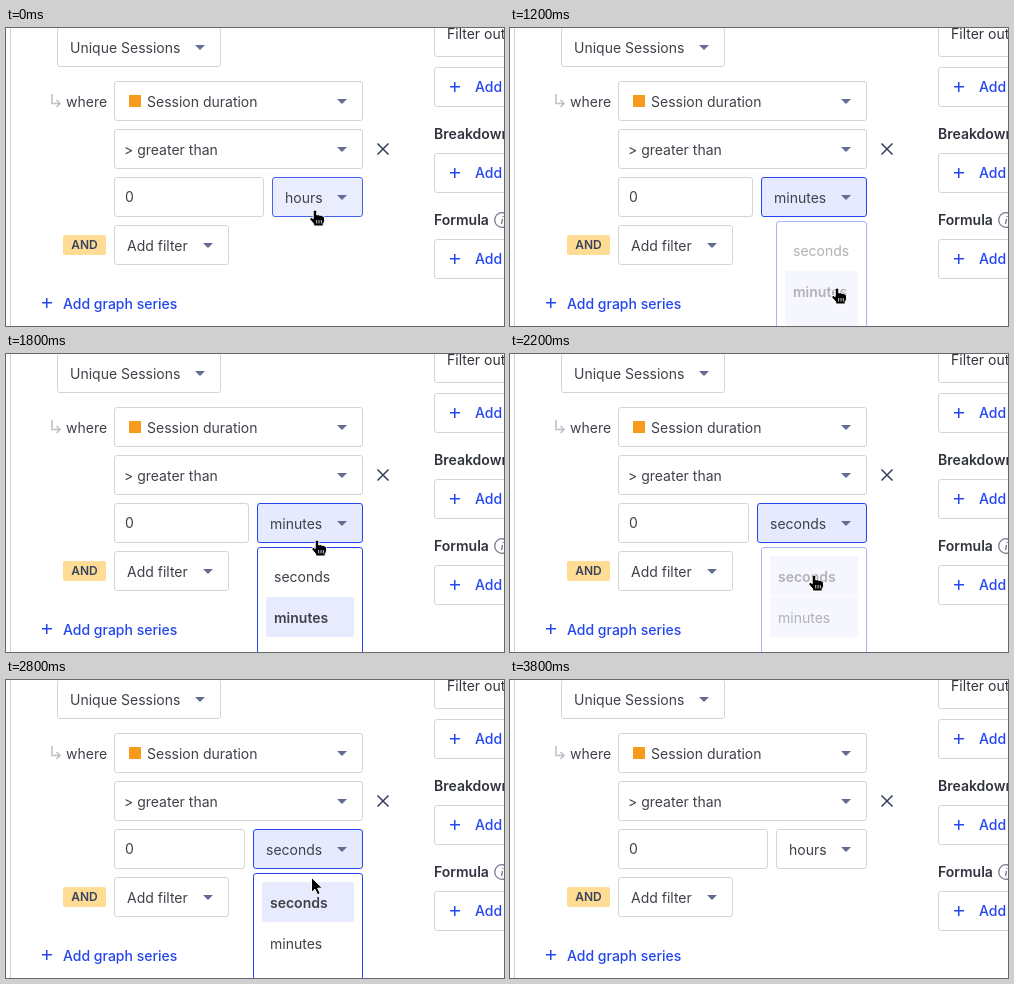
An HTML page that plays this animation: 498x298 px, repeating every 4500 ms.

```html
<!DOCTYPE html>
<html lang="en">
<head>
<meta charset="utf-8">
<title>Session duration filter</title>
<style>
  html, body { margin: 0; width: 100%; height: 100%; overflow: hidden; background: #fff; }
  #stage {
    --blue: #2446ee;
    position: relative; width: 498px; height: 298px; overflow: hidden;
    font: 14px/20px Inter, "Open Sans", sans-serif; color: #3f4149;
  }
  #stage * { box-sizing: border-box; }
  .abs, .box, .menu, svg { position: absolute; white-space: nowrap; }
  .box {
    height: 40px; border: 1px solid #d2d4da; border-radius: 3px;
    background: #fff; line-height: 40px; padding-left: 12px;
  }
  .wide { left: 108px; width: 249px; }
  .caret::after {
    content: ""; position: absolute; right: 15px; top: 17px;
    border: 5px solid transparent; border-top-color: #626b92; border-bottom: 0;
  }
  .blue { color: var(--blue); font-weight: 500; }
  .head { left: 428px; color: #30333d; font-weight: 600; }
  .side { left: 428px; width: 120px; line-height: 38px; }
  .add { padding-left: 40px; }
  .plus, .add::before {
    content: ""; position: absolute; left: 15px; top: 14px; width: 10px; height: 10px;
    background: linear-gradient(var(--blue) 0 0) center / 10px 1.5px no-repeat,
                linear-gradient(var(--blue) 0 0) center / 1.5px 10px no-repeat;
  }
  .badge {
    left: 57px; top: 207px; width: 43px; height: 20px; border-radius: 2px;
    background: #fedc94; color: #39425f; font-size: 12px; font-weight: 600; text-align: center;
  }
  .menu {
    top: 193px; height: 150px; padding: 8px; border: 1px solid var(--blue);
    border-radius: 3px; background: #fff;
  }
  .item { height: 40px; margin-bottom: .5px; padding-left: 8px; line-height: 41px; border-radius: 2px; }
  .lit { background: #e8ebfe; }
  .chosen { font-weight: 600; }
  svg { overflow: visible; }
</style>
</head>
<body>
<div id="stage">
  <div class="abs" style="left:4px;top:0;width:1px;height:298px;background:#cdcfd5"></div>
  <div class="box caret" style="left:51px;top:-1px;width:164px">Unique Sessions</div>

  <svg style="left:0;top:0" width="498" height="298" fill="none">
    <path d="M46 66v9.500h7.500M50.500 72l3.500 3.500-3.500 3.500" stroke="#bfc1c8" stroke-width="1.6"/>
    <path d="M371.500 115.500l11 11m0-11l-11 11" stroke="#323c5e" stroke-width="1.5"/>
    <g stroke="#747a92" stroke-width="1.3">
      <circle cx="496" cy="192" r="7.300"/>
      <path d="M496.500 191l-1 5M497 188v1"/>
    </g>
  </svg>
  <div class="abs" style="left:60px;top:64px">where</div>

  <div class="box wide caret" style="top:53px;padding-left:32px">Session duration</div>
  <div class="abs" style="left:123px;top:67px;width:12px;height:12px;background:#f79a1e"></div>
  <div class="box wide caret" style="top:101px;padding-left:9px">&gt; greater than</div>
  <div class="box" id="amount" style="left:108px;top:149px;padding-left:10px;line-height:38px">0</div>
  <div class="box caret" id="unit" style="top:149px"></div>

  <div class="abs badge">AND</div>
  <div class="box caret" style="left:108px;top:197px;width:115px">Add filter</div>
  <i class="plus" style="left:36px;top:270px"></i>
  <div class="abs blue" style="left:57px;top:266px">Add graph series</div>

  <div class="box side" style="top:-11px;line-height:31px;color:#30333d">Filter out</div>
  <div class="box side add blue" style="top:39px">Add</div>
  <div class="abs head" style="top:96px">Breakdown</div>
  <div class="box side add blue" style="top:125px">Add</div>
  <div class="abs head" style="top:182px">Formula</div>
  <div class="box side add blue" style="top:211px">Add</div>

  <div class="menu" id="menu"></div>

  <svg id="cursor" style="left:0;top:0" width="1" height="1" stroke="#fff" stroke-linejoin="round">
    <path id="arrow" d="M0 0V15l3.500-3.300 2.500 5.500 2.700-1.200-2.500-5.300H11Z"/>
    <g id="hand">
      <path d="M-1.800 1.500Q-1.800 0 0 0T1.800 1.500V5Q3.500 4 4.700 5.400 6.300 4.600 7.400 6 9.300 5.600 9.500 8V10.500Q9.500 12.500 8.200 13.500V16H-1.300V14L-5 9.500Q-5.500 7.800-4 7.400-2.900 7.400-1.800 8.700Z"/>
      <path d="M1.700 10v3.500M4 10v3.500M6.300 10v3.500" stroke-width=".8"/>
    </g>
  </svg>
</div>

<script>
  const LOOP = 4500, STEP = 100, RIGHT = 357;
  const units = [
    { name: "seconds", left: 247 },
    { name: "minutes", left: 251 },
    { name: "hours", left: 266 }
  ];
  const [seconds, minutes, hours] = units;

  // Each round focuses the select, opens its menu and picks a unit.
  const rounds = [
    { focus: -150, open: 500, pick: 1200, unit: minutes },
    { focus: 1500, open: 1800, pick: 2200, unit: seconds },
    { focus: 2600, open: 2800, pick: 3500, unit: hours }
  ];

  const home = { x: 309, y: 182 };
  const moves = [
    { from: 0, to: 300, x: 312, y: 191 },
    { from: 500, to: 1000, x: 327, y: 260 },
    { from: 1200, to: 1700, x: 311, y: 186 },
    { from: 1800, to: 2000, x: 304, y: 221 },
    { from: 2200, to: 2400, x: 307, y: 174 },
    { from: 2700, to: 2900, x: 304, y: 221 },
    { from: 2900, to: 3100, x: 304, y: 286 },
    { from: 3200, to: 3300, x: 304, y: 330 }
  ];

  // Rest, hover and focus looks of the select.
  const fills = ["#ffffff", "#eef0fe", "#e6eafe"];
  const lines = ["#d2d4da", "#6a7bf0", "#2446ee"];

  const $ = id => document.getElementById(id);
  const ramp = (t, start, length) => Math.min(1, Math.max(0, (t - start) / length));
  const smooth = k => k * k * (3 - 2 * k);

  const unitAt = t => rounds.reduce((unit, r) => t >= r.pick ? r.unit : unit, hours);

  function pointerAt(t) {
    return moves.reduce((p, m) => {
      const k = smooth(ramp(t, m.from, m.to - m.from));
      return { x: p.x + (m.x - p.x) * k, y: p.y + (m.y - p.y) * k };
    }, home);
  }

  function blend(colors, level) {
    const i = Math.min(1, Math.floor(level));
    return `color-mix(in srgb, ${colors[i + 1]} ${(level - i) * 100}%, ${colors[i]})`;
  }

  function place(el, left) {
    el.style.left = left + "px";
    el.style.width = RIGHT - left + "px";
  }

  const items = units.map(unit => {
    const el = document.createElement("div");
    el.textContent = unit.name;
    $("menu").append(el);
    return el;
  });

  function draw(t) {
    const picked = unitAt(t);
    const previous = unitAt(t - STEP);
    const { x, y } = pointerAt(t);
    const isOpen = rounds.some(r => t >= r.open && t < r.pick);
    const isFading = picked !== previous;
    const onSelect = y < 190;
    const onMenu = (isOpen || isFading) && y >= 202;

    const press = Math.max(...rounds.map(r => ramp(t, r.focus, 200) - ramp(t, r.pick, 200)));
    const level = Math.max(onSelect ? 1 : 0, 2 * press);
    $("unit").textContent = picked.name;
    $("unit").style.background = blend(fills, level);
    $("unit").style.borderColor = blend(lines, level);
    place($("unit"), picked.left);
    $("amount").style.width = picked.left - 116 + "px";

    // The closing menu fades where it was opened.
    place($("menu"), previous.left);
    $("menu").style.opacity = isOpen ? 1 : isFading ? 0.4 : 0;
    const hovered = Math.floor((y - 202) / 40.5);
    items.forEach((el, i) => {
      el.className = "item";
      el.classList.toggle("chosen", units[i] === picked);
      el.classList.toggle("lit", units[i] === previous || i === hovered);
    });

    const isHand = onSelect || onMenu;
    $("hand").style.display = isHand ? "" : "none";
    $("arrow").style.display = isHand ? "none" : "";
    $("cursor").style.transform = `translate(${x}px, ${y}px)`;
  }

  const start = performance.now();
  function tick() {
    const t = (performance.now() - start) % LOOP;
    draw(Math.floor(t / STEP) * STEP);
    requestAnimationFrame(tick);
  }
  tick();
</script>
</body>
</html>
```
